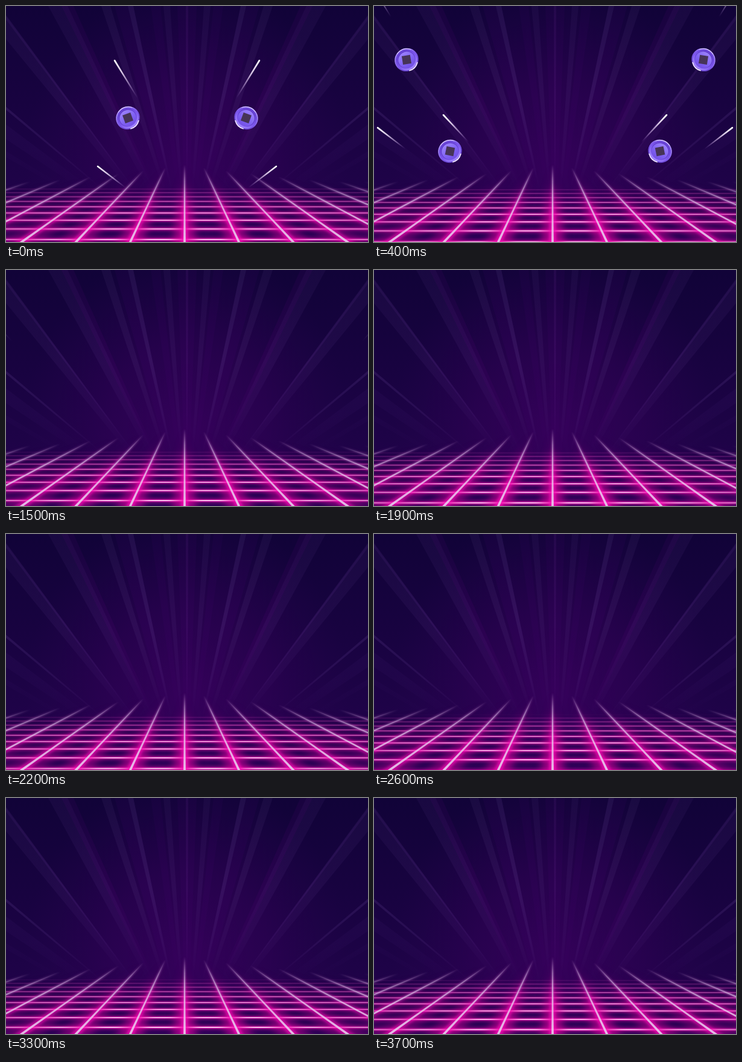
Animation of 600 by 390 pixels, one loop 3.8 s. Source, as an HTML page with a canvas:

```html
<!DOCTYPE html>
<html lang="en">
<head>
<meta charset="utf-8">
<title>Neon floor</title>
<style>
html, body { margin: 0; width: 100%; height: 100%; overflow: hidden; background: #14043a; }
canvas { display: block; width: 600px; height: 390px; }
</style>
</head>
<body>
<canvas id="stage" width="600" height="390"></canvas>
<script>
const W = 600, H = 390, LOOP = 3800, STEP = 100;
const stage = document.getElementById('stage').getContext('2d');
const backdrop = layer(paintBackdrop);
const rails = layer(paintRails);

function layer(paint) {
  const c = document.createElement('canvas');
  c.width = W;
  c.height = H;
  paint(c.getContext('2d'));
  return c;
}

function fade(g, stops) {
  stops.forEach(([at, color]) => g.addColorStop(at, color));
  return g;
}

function mirrored(c, draw) {
  draw();
  c.save();
  c.translate(W, 0);
  c.scale(-1, 1);
  draw();
  c.restore();
}

function paintBackdrop(c) {
  c.fillStyle = fade(c.createLinearGradient(0, 0, 0, H), [
    [0, '#110338'], [0.4, '#180340'], [0.72, '#1e0347'], [0.85, '#22024c'], [1, '#280054']
  ]);
  c.fillRect(0, 0, W, H);
  c.save();
  c.translate(300, 270);
  c.scale(1, 1.15);
  c.fillStyle = fade(c.createRadialGradient(0, 0, 0, 0, 0, 270), [
    [0, 'rgba(62,0,98,.72)'], [0.5, 'rgba(56,0,92,.42)'], [1, 'rgba(46,0,84,0)']
  ]);
  c.fillRect(-300, -300, W, 420);
  c.restore();

  // each beam: left and right edge along the top, colour, strength
  const beams = [
    [-440, -400, '130,70,190', .05], [-330, -262, '110,60,170', .08],
    [-207, -197, '150,105,205', .15], [-45, -12, '120,80,170', .09],
    [-17, -11, '140,75,195', .10], [70, 102, '115,75,165', .10],
    [92, 112, '100,0,130', .12], [158, 173, '125,100,170', .10],
    [180, 202, '80,0,125', .10], [202, 211, '145,100,200', .14],
    [240, 256, '85,0,130', .08], [261, 272, '120,90,170', .09],
    [284, 300, '95,0,135', .08], [298, 300, '140,60,180', .12]
  ];
  mirrored(c, () => beams.forEach(([a, b, rgb, alpha]) => {
    c.fillStyle = fade(c.createLinearGradient(0, 0, 0, 300), [
      [0, `rgba(${rgb},${alpha * .8})`], [0.5, `rgba(${rgb},${alpha})`],
      [0.8, `rgba(${rgb},${alpha * .6})`], [1, `rgba(${rgb},0)`]
    ]);
    c.beginPath();
    c.moveTo(a, 0);
    c.lineTo(b, 0);
    c.lineTo(300, 420);
    c.fill();
  }));
}

// Floor lines running to the vanishing point
function paintRails(c) {
  const vx = 296, vy = 200, slope = .474;
  for (let n = -11; n <= 11; n++) {
    const side = Math.abs(n);
    const top = Math.min(262 + side * 5, 290);
    const power = 1 / (1 + (side / 3.2) ** 2);
    const spread = Math.hypot(1, n * slope);
    const x = y => vx + n * slope * (y - vy);
    const wedge = (tip, half, blur, rgb, stops) => {
      const a = tip * spread, b = half * spread;
      c.filter = `blur(${blur}px)`;
      c.fillStyle = fade(c.createLinearGradient(0, top, 0, H),
        stops.map(([at, alpha]) => [at, `rgba(${rgb},${alpha})`]));
      c.beginPath();
      c.moveTo(x(top) - a, top);
      c.lineTo(x(top) + a, top);
      c.lineTo(x(H + 30) + b, H + 30);
      c.lineTo(x(H + 30) - b, H + 30);
      c.fill();
    };
    wedge(3, 22, 7, '230,0,160', [[0, 0], [.25, .05 * power], [.6, .62 * power], [1, .62 * power]]);
    wedge(2, 7, 2, '250,10,180', [[0, 0], [.25, .1], [.6, .3 + .35 * power], [1, .4 + .35 * power]]);
    wedge(1.8, 2.5, 1.2, '170,130,195', [[0, 0], [.2, .42], [.4, .5], [.7, 0], [1, 0]]);
    wedge(.5, 2.2, .5, '232,208,240', [[0, 0], [.2, .35], [.55, .75], [1, .9]]);
  }
}

// Floor lines rolling towards the viewer
function drawRungs(t) {
  const horizon = 205, gap = .00059;
  const phase = ((.37 - .495 * t) % 1 + 2) % 1;
  const clamp = v => Math.max(0, Math.min(1, v));
  const coats = [[13, '225,0,160', .12], [8, '235,0,165', .2], [4.4, '250,20,185', .6], [2, '255,215,248', .9]];
  for (let i = 8; i < 19; i++) {
    const y = horizon + 1 / ((i + phase) * gap);
    const near = clamp((y - 298) / 45);
    const size = .35 + .65 * clamp((y - 300) / 85);
    for (const [thick, rgb, alpha] of coats) {
      const h = thick * size, mid = alpha * near;
      stage.fillStyle = fade(stage.createLinearGradient(0, 0, W, 0), [
        [0, `rgba(${rgb},${mid * .7})`], [0.3, `rgba(${rgb},${mid})`],
        [0.7, `rgba(${rgb},${mid})`], [1, `rgba(${rgb},${mid * .7})`]
      ]);
      stage.fillRect(0, y - h / 2, W, h);
    }
  }
}

function drawStreak(hx, hy, tx, ty, alpha = 1) {
  const c = stage, len = Math.hypot(tx - hx, ty - hy);
  const nx = (ty - hy) / len * 1.4, ny = (hx - tx) / len * 1.4;
  c.fillStyle = fade(c.createLinearGradient(hx, hy, tx, ty), [
    [0, `rgba(255,255,255,${alpha})`], [0.35, `rgba(240,225,250,${alpha * .85})`],
    [0.7, `rgba(190,160,215,${alpha * .5})`], [1, 'rgba(150,110,190,0)']
  ]);
  c.beginPath();
  c.arc(hx, hy, 1.3, 0, 7);
  c.moveTo(hx + nx, hy + ny);
  c.lineTo(tx + nx * .6, ty + ny * .6);
  c.lineTo(tx - nx * .6, ty - ny * .6);
  c.lineTo(hx - nx, hy - ny);
  c.fill();
}

function disc(r, fill) {
  stage.fillStyle = fill;
  stage.beginPath();
  stage.ellipse(0, 0, r, r * .95, -.5, 0, 7);
  stage.fill();
}

function drawCoin(x, y, turn, alpha = 1) {
  const c = stage;
  const shade = (a, b, d) => fade(c.createLinearGradient(-12, -14, 12, 15), [[0, a], [.55, b], [1, d]]);
  c.save();
  c.globalAlpha = alpha;
  c.translate(x, y);
  disc(20, shade('#b49cff', '#7a55e6', '#5b38c0'));
  disc(18.2, shade('#6540d2', '#7d58ee', '#a78cff'));
  disc(15, shade('#5a36c4', '#6a45d8', '#7e5cf0'));
  disc(13.8, shade('#a48cff', '#8062f2', '#6c48e0'));
  c.lineCap = 'round';
  c.strokeStyle = '#f4eaff';
  c.lineWidth = 1.6;
  c.beginPath();
  c.arc(0, 0, 18.4, .25, 1.3);
  c.stroke();
  c.strokeStyle = 'rgba(225,210,255,.75)';
  c.lineWidth = 1.2;
  c.beginPath();
  c.arc(0, 0, 18.3, 3.7, 5.1);
  c.stroke();
  c.rotate(turn);
  c.fillStyle = '#463457';
  c.fillRect(-7, -7, 14, 14);
  c.restore();
}

const eased = (t, k) => 1 - Math.exp(-k * t);

function drawBurst(t) {
  if (t < 1) {
    const a = eased(t, 1.08), b = eased(t, 4);
    drawStreak(180 - 238 * b, 90 - 168 * b, 218 - 238 * b, 152 - 168 * b);
    drawStreak(152 - 416 * a, 265 - 182 * a, 198 - 416 * a, 300 - 182 * a);
    drawCoin(202 - 422 * a, 185 - 274 * a, -.35 + 4.4 * t);
  }
  if (t > .24 && t < 1.6) {
    const p = eased(t - .24, 4.86);
    const x = 300 - 322 * p, y = 367 - 235 * p;
    const alpha = Math.min(1, (1.6 - t) / .4);
    drawStreak(x - 11, y - 60, x + 31, y - 15, alpha);
    drawCoin(x, y, .2 + 1.5 * (t - .4), alpha);
  }
}

function frame(now) {
  const t = Math.floor((now - start) % LOOP / STEP) * STEP / 1000;
  stage.drawImage(backdrop, 0, 0);
  drawRungs(t);
  stage.drawImage(rails, 0, 0);
  mirrored(stage, () => drawBurst(t));
}

const start = performance.now();
function tick() {
  frame(performance.now());
  requestAnimationFrame(tick);
}
tick();
</script>
</body>
</html>
```
